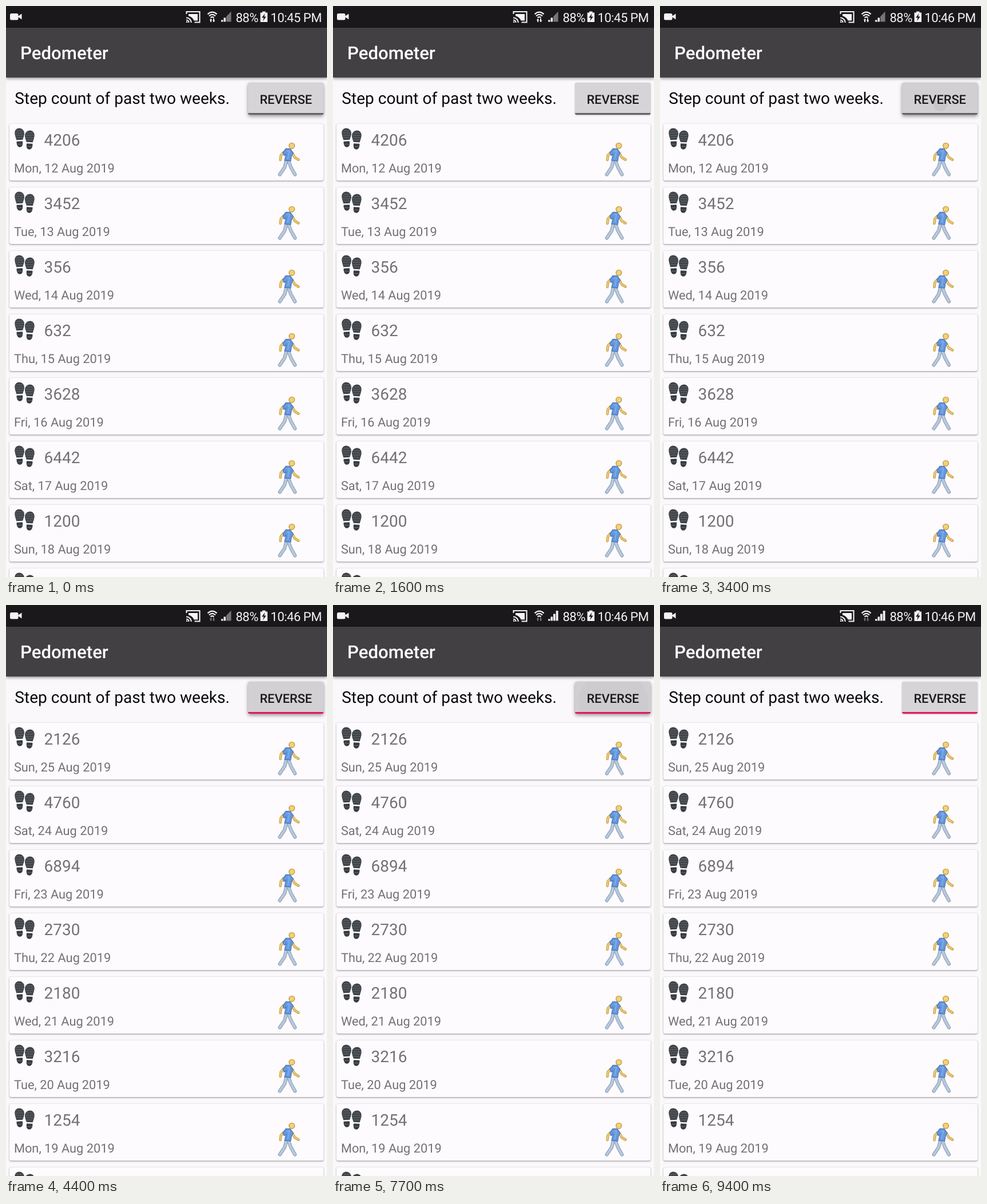
An HTML page for the animation above (9.5 s loop, 561x998 px).

```html
<!DOCTYPE html>
<html lang="en">
<head>
<meta charset="utf-8">
<title>Pedometer</title>
<style>
  html, body { margin: 0; width: 100%; height: 100%; overflow: hidden; background: #faf8fb; }
  #stage { position: relative; width: 561px; height: 998px; overflow: hidden; background: #faf8fb; }
  #stage > * { position: absolute; }
  .status { left: 0; top: 0; width: 561px; height: 38px; background: #1a181a; }
  .bar { left: 0; top: 37.5px; width: 561px; height: 87px; background: #424042; box-shadow: 0 2px 5px rgba(0,0,0,.42); }
  .card { left: 6px; width: 549px; height: 98.5px; border-radius: 3px; background: #fdfbfe;
          box-shadow: 0 1.5px 2.5px rgba(0,0,0,.3), 0 0 2px rgba(0,0,0,.2); }
  #button { left: 423px; top: 133.5px; width: 132px; height: 56px; border-radius: 3px; overflow: hidden; background: #d6d4d7; }
  #ripple, #line { position: absolute; }
  #ripple { border-radius: 50%; background: #000; }
  #line { left: 0; bottom: 0; width: 100%; height: 3px; }
  svg { left: 0; top: 0; }
  text { font-family: Roboto, Arial, sans-serif; text-rendering: geometricPrecision; }
  .count { font-size: 28px; fill: #737173; }
  .date { font-size: 21.8px; fill: #737173; }
  .clock { font-size: 22px; letter-spacing: -.5px; fill: #f4f4f4; }
  .soft { filter: blur(.5px); }
</style>
</head>
<body>
<div id="stage">
  <div class="status"></div>
  <div class="bar"></div>
  <div id="button"><div id="ripple"></div><div id="line"></div></div>
  <svg id="art" width="561" height="998" viewBox="0 0 561 998">
    <defs>
      <g id="sole">
        <path d="M8 0C3 0 0 4 .3 9C.6 13.500 2.500 17 3.200 20.800L14.200 20.300C15.500 16 17 13 17 9C17 4 13 0 8 0Z" fill="#3f4347"/>
        <path d="M3.600 23.300L13.900 22.800C14.800 28 14 33 9.500 33.200C5 33.500 3.200 28 3.600 23.300Z" fill="#373b3f"/>
        <path d="M3 4.500H14M1.500 8.500H16M2 12.500H15.500M3.500 16.500H14.500M5 28H13" stroke="#666c71" stroke-width="1" fill="none"/>
      </g>
      <g id="steps" class="soft">
        <use href="#sole" x="15" y="7.500"/>
        <use href="#sole" transform="translate(50 11.500) scale(-1 1)"/>
      </g>
      <g id="walker" class="soft" fill="none" stroke-linecap="round" stroke-linejoin="round"></g>
    </defs>

    <g fill="#f4f4f4">
      <rect x="7" y="13" width="14.500" height="11.500" rx="2.500"/>
      <path d="M20 18.500L27.500 13.500V23.500Z"/>
      <path d="M319 14H335V25.500H328.500C327 21.500 323.500 18.500 319 17.500Z"/>
      <g fill="none" stroke="#f4f4f4" stroke-width="2.100">
        <path d="M315.500 14V10H338.500V28.500H329.500M315 20.500A8.500 8.500 0 0 1 323.800 29M315 24.500A4.500 4.500 0 0 1 319.500 29"/>
        <path d="M352.500 14.300Q360.500 7 368.500 14.300M355 17.500Q360.500 12.300 366 17.500M357.600 20.600Q360.500 17.600 363.400 20.600" stroke-width="2.300"/>
      </g>
      <path d="M315 26.500A2.500 2.500 0 0 1 317.500 29H315Z"/>
      <g id="arrows"><path d="M358 22L360.500 25H359V28H357V25H355.500Z"/><path d="M363 28.500L360.800 25.300H362V22H364V25.300H365.500Z"/></g>
      <path id="dimBars" d="M385 18.500L393.500 9.500V27.500H385Z" fill="#777577"/>
      <path d="M376 24.500H379.500V27.500H376ZM380.500 20.500H384V27.500H380.500Z"/>
      <path id="fullBars" d="M385 15.500H388.700V27.500H385ZM389.700 10H393.500V27.500H389.700Z"/>
      <path d="M448 9.500H453.500V11.500H457V28H444.500V11.500H448Z"/>
      <path d="M452.500 13L447 20.500H450.500L449 26.500L454.700 18.500H451.200Z" fill="#1a181a"/>
    </g>
    <text class="clock" x="401.500" y="27.500">88%</text>
    <text class="clock" id="clock" x="462.300" y="27.500"></text>
    <text x="25" y="93" font-size="31.200" font-weight="500" fill="#fff">Pedometer</text>
    <text x="15.300" y="170.500" font-size="28.050" fill="#080808">Step count of past two weeks.</text>
    <text x="489.200" y="170.700" text-anchor="middle" font-size="21.800" font-weight="500" fill="#1b191b">REVERSE</text>
  </svg>
</div>
<script>
const LOOP = 9500, ROWS = 8, PITCH = 111, TOP = 206;
const counts = [4206, 3452, 356, 632, 3628, 6442, 1200, 1254, 3216, 2180, 2730, 6894, 4760, 2126];
const days = ['Mon', 'Tue', 'Wed', 'Thu', 'Fri', 'Sat', 'Sun'];
const $ = id => document.getElementById(id);

function make(parent, tag, attrs) {
  const el = document.createElementNS('http://www.w3.org/2000/svg', tag);
  for (const key in attrs) el.setAttribute(key, attrs[key]);
  return parent.appendChild(el);
}

// Each limb is a dark outline under a lighter stroke.
function limb(d, width, dark, light) {
  make($('walker'), 'path', { d, stroke: dark, 'stroke-width': width });
  make($('walker'), 'path', { d, stroke: light, 'stroke-width': width - 2.6 });
}

const gold = ['#c9a44c', '#f3d17c'], pale = ['#93a5bb', '#b9cade'];
limb('M490 64L487 76L478.500 88.500', 6.2, ...pale);
limb('M493.500 64L498 76L505 88.500', 6.2, ...pale);
limb('M485 50L480.500 55L479.500 63', 4.6, ...gold);
limb('M501 52L504.500 58.500L511 62.500', 4.6, ...gold);
make($('walker'), 'path', {
  d: 'M489 43.500L496.500 43.500L502 51L499 56L497.500 65L487 64L489.500 53L486 55.500L484 50.500Z',
  fill: '#6598df', stroke: '#4c79bd', 'stroke-width': 1.4
});
make($('walker'), 'path', { d: 'M491.500 48L495.500 47L492.500 61', stroke: '#86b0ea', 'stroke-width': 1.6 });
make($('walker'), 'circle', { cx: 499.5, cy: 38.3, r: 4.8, fill: gold[1], stroke: gold[0], 'stroke-width': 1.7 });

const rows = Array.from({ length: ROWS }, (_, i) => {
  const y = TOP + i * PITCH;
  const card = document.createElement('div');
  card.className = 'card';
  card.style.top = y + 'px';
  $('stage').insertBefore(card, $('art'));
  make($('art'), 'use', { href: '#steps', y });
  make($('art'), 'use', { href: '#walker', y });
  return {
    count: make($('art'), 'text', { class: 'count', x: 66.5, y: y + 37.7 }),
    date: make($('art'), 'text', { class: 'date', x: 13.9, y: y + 84.5 })
  };
});

let shown = null;
function showList(reversed) {
  if (shown === reversed) return;
  shown = reversed;
  rows.forEach((row, i) => {
    const n = reversed ? 13 - i : i;
    row.count.textContent = counts[n];
    row.date.textContent = `${days[n % 7]}, ${12 + n} Aug 2019`;
  });
  $('line').style.background = reversed ? '#e2185f' : '#646265';
}

const lift = [[0, 1], [300, 1], [600, 0], [3300, 0], [3390, 1], [4450, 1], [4700, 0], [7600, 0],
  [7700, 1], [8200, 1], [8450, 0], [8650, 0], [8750, 1], [9150, 1], [9350, 0]];
const tint = [[600, 0], [3300, 0], [3390, 1], [4400, .8], [4600, 0], [7600, 0], [7700, 1], [8200, .6],
  [8450, 0], [8650, 0], [8750, 1], [9050, .8], [9350, 0]];
const presses = [3390, 7610, 8690];

function track(points, t) {
  if (t <= points[0][0]) return points[0][1];
  for (let i = 1; i < points.length; i++) {
    const [a, from] = points[i - 1], [b, to] = points[i];
    if (t <= b) return from + (to - from) * (t - a) / (b - a);
  }
  return points[points.length - 1][1];
}

function drawButton(t) {
  const up = track(lift, t), shade = 1 - .022 * track(tint, t);
  $('button').style.background = `rgb(${[214, 212, 215].map(c => c * shade)})`;
  $('button').style.boxShadow =
    `0 ${1 + 2 * up}px ${2.5 + 4 * up}px rgba(0,0,0,${.22 + .16 * up}), 0 0 ${2 + up}px rgba(0,0,0,.12)`;
  const age = presses.map(p => t - p).find(a => a >= 0 && a < 450);
  const style = $('ripple').style;
  if (age === undefined) { style.opacity = 0; return; }
  const r = Math.min(5 + age * .62, 110);
  style.width = style.height = 2 * r + 'px';
  style.left = 67 - r + 'px';
  style.top = 38.5 - r + 'px';
  style.opacity = track([[0, .05], [110, .015], [450, 0]], age);
}

function draw(t) {
  showList((t >= 3700 && t < 7800) || t >= 8900);
  drawButton(t);
  $('clock').textContent = t < 2900 ? '10:45 PM' : '10:46 PM';
  const strong = t >= 5400;
  $('fullBars').style.opacity = strong ? 1 : 0;
  $('dimBars').style.opacity = strong ? 0 : 1;
  const idle = (t >= 4000 && t < 8100) || t >= 9100;
  $('arrows').style.opacity = idle ? .4 : 1;
}

const start = performance.now();
function tick() {
  draw((performance.now() - start) % LOOP);
  requestAnimationFrame(tick);
}
tick();
</script>
</body>
</html>
```
